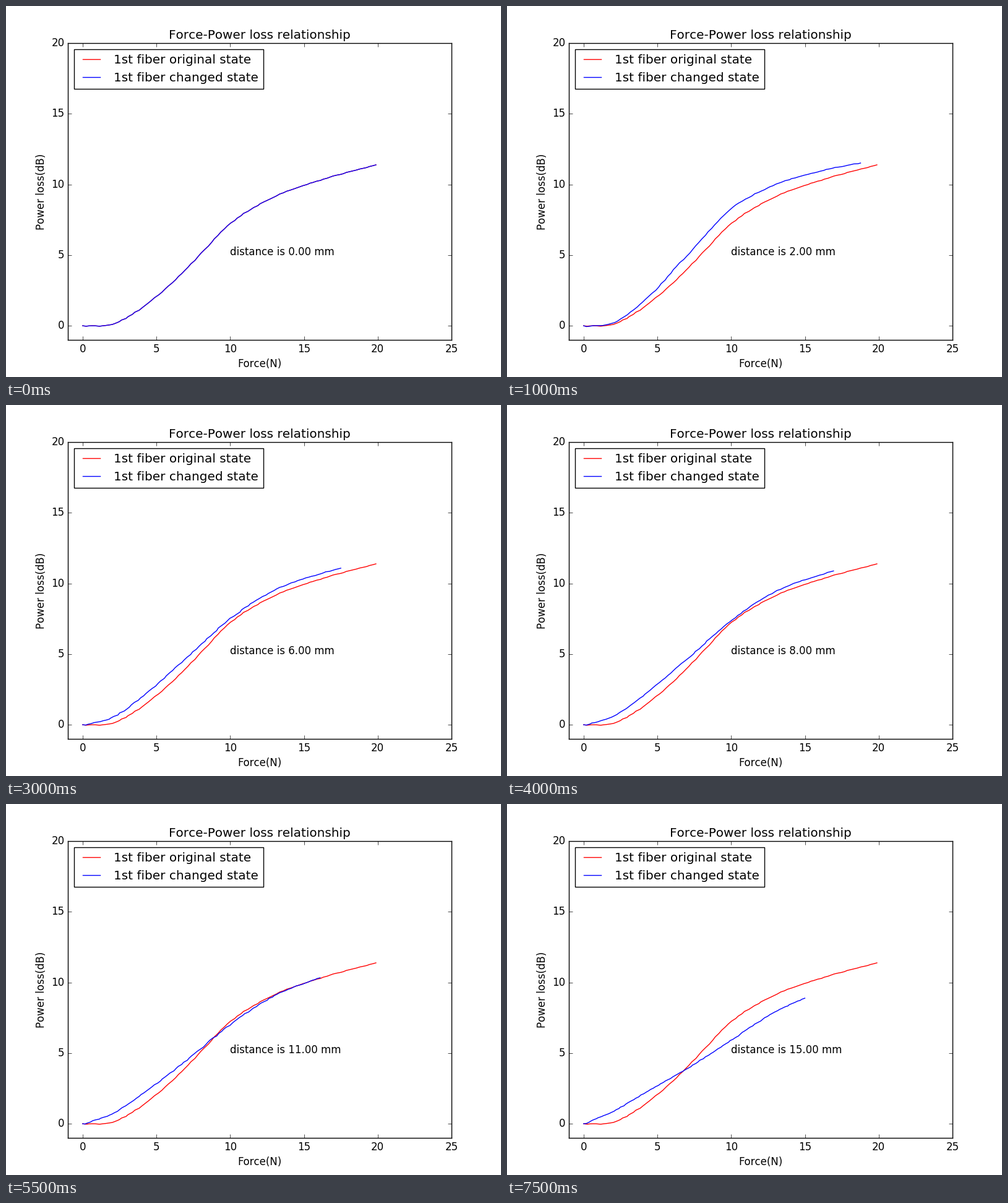
These frames come from a looping animation (800x600 px, 8 s). A matplotlib script:

```python
import numpy as np
import matplotlib.pyplot as plt
from matplotlib.animation import FuncAnimation

plt.style.use("classic")
plt.rcParams["text.kerning_factor"] = 6

STEPS, INTERVAL = 16, 500
READINGS = 90

# Power loss (dB) at a few forces (N, columns) and distances (mm, rows)
FORCES = np.array([0, 2, 4, 7, 10, 13, 16, 20])
DISTANCES = np.array([0, 2, 6, 10, 15])
LOSS = np.array([
    [0, 0.10, 1.25, 4.00, 7.22, 9.12, 10.27, 11.42],
    [0, 0.20, 1.68, 4.97, 8.27, 9.98, 10.93, 11.75],
    [0, 0.50, 1.95, 4.70, 7.50, 9.53, 10.65, 11.70],
    [0, 0.65, 2.07, 4.55, 7.20, 9.25, 10.46, 11.60],
    [0, 0.88, 2.10, 3.88, 5.92, 7.92, 9.30, 10.60],
])


def hermite(x, xs, ys):
    """Smooth cubic through the points (xs, ys), along the first axis of ys."""
    slopes = np.gradient(ys, xs, axis=0)
    i = np.clip(np.searchsorted(xs, x) - 1, 0, len(xs) - 2)
    h = xs[i + 1] - xs[i]
    t = (x - xs[i]) / h
    return ((1 + 2 * t) * (1 - t) ** 2 * ys[i] + t * (1 - t) ** 2 * h * slopes[i]
            + t * t * (3 - 2 * t) * ys[i + 1] + t * t * (t - 1) * h * slopes[i + 1])


def max_force(mm):
    """Last measured force: a steady decline after a quick initial drop."""
    return 19.15 - 0.277 * mm + 0.73 * np.exp(-mm / 1.4)


def curve(mm):
    """Force and loss readings for one distance, with a little sensor noise."""
    force = np.linspace(0, max_force(mm), READINGS)
    loss = hermite(force, FORCES, hermite(mm, DISTANCES, LOSS))
    loss -= (0.07 if mm else 0.03) * np.exp(-(force / 0.6) ** 2)

    rng = np.random.default_rng(mm)
    force[1:-1] += rng.uniform(-0.05, 0.05, READINGS - 2)
    loss[1:-1] += rng.uniform(-0.015, 0.015, READINGS - 2)
    loss[0] = 0
    return force, loss


fig, ax = plt.subplots(figsize=(8, 6), dpi=100, facecolor="white")
ax.set(xlim=(-1, 25), ylim=(-1, 20), xlabel="Force(N)", ylabel="Power loss(dB)",
       title="Force-Power loss relationship")
ax.plot(*curve(0), "r", label="1st fiber original state")
changed, = ax.plot(*curve(0), "b", label="1st fiber changed state")
note = ax.text(10, 5, "")
ax.legend(loc="upper left")


def update(mm):
    changed.set_data(*curve(mm))
    note.set_text(f"distance is {mm:.2f} mm")
    return changed, note


anim = FuncAnimation(fig, update, frames=STEPS, interval=INTERVAL, repeat=True, repeat_delay=0)
plt.show()
```
